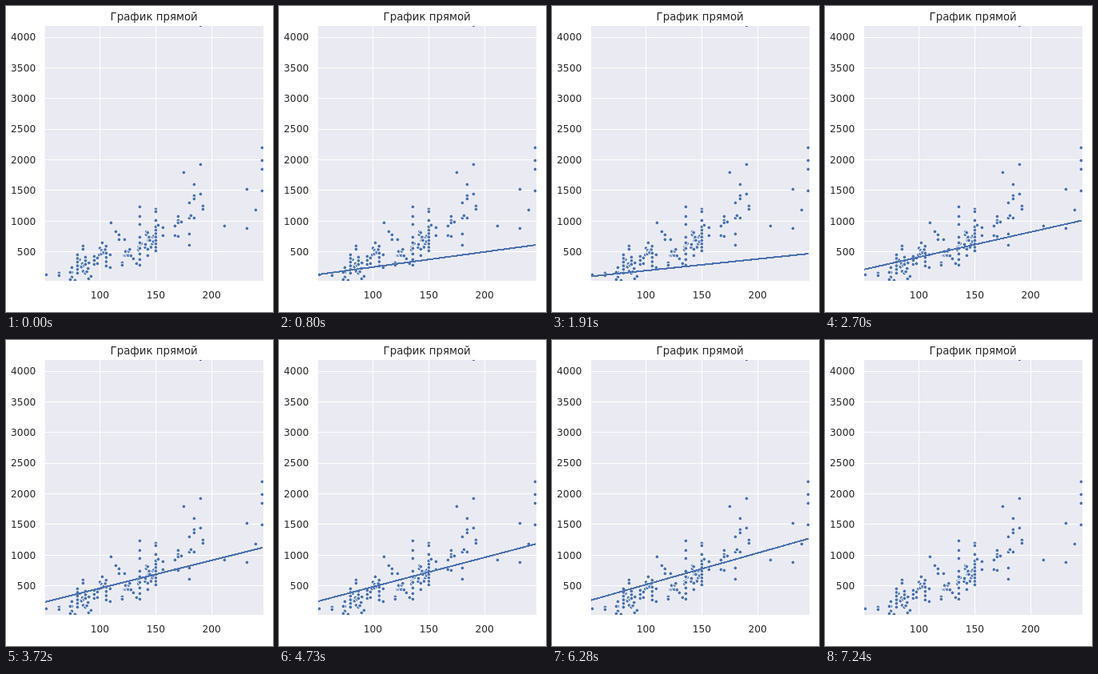
Write an HTML page that moves like this. It is 334 by 383 pixels and loops after 7290 ms.

```html
<!DOCTYPE html>
<html lang="ru">
<head>
<meta charset="utf-8">
<title>График прямой</title>
<style>
  html, body { margin: 0; width: 100%; height: 100%; overflow: hidden; background: #fff; }
  svg { display: block; }
  text { font: 12.22px "DejaVu Sans", sans-serif; fill: #262626; }
  #title { font-size: 13.33px; text-anchor: middle; }
  .x { text-anchor: middle; }
  .y { text-anchor: end; }
  #grid line { stroke: #fff; stroke-width: 1; }
  #dots circle { fill: #4c72b0; stroke: #fff; stroke-width: 0.9; }
  #fit { stroke: #4c72b0; stroke-width: 2.1; shape-rendering: crispEdges; }
</style>
</head>
<body>
<svg width="334" height="383" viewBox="0 0 334 383">
  <clipPath id="area"><rect x="49" y="25" width="273" height="319"/></clipPath>
  <rect x="49" y="25" width="273" height="319" fill="#eaeaf2"/>
  <g id="grid"></g>
  <g id="labels"></g>
  <g clip-path="url(#area)">
    <g id="dots"></g>
    <line id="fit"/>
  </g>
  <text id="title" x="185.2" y="18">График прямой</text>
</svg>
<script>
const LOOP = 7290;
const $ = id => document.getElementById(id);

// data units to pixels
const px = v => 117.4 + (v - 100) * 1.398;
const py = v => 345.8 - v * 0.0767;

function add(parent, tag, attrs, text) {
  const el = document.createElementNS("http://www.w3.org/2000/svg", tag);
  for (const k in attrs) el.setAttribute(k, attrs[k]);
  if (text) el.textContent = text;
  $(parent).append(el);
}

const snap = v => Math.floor(v) + 0.5;
for (let v = 100; v <= 200; v += 50) {
  const x = snap(px(v));
  add("grid", "line", { x1: x, x2: x, y1: 25, y2: 344 });
  add("labels", "text", { class: "x", x: px(v), y: 365.5 }, String(v));
}
for (let v = 500; v <= 4000; v += 500) {
  const y = snap(py(v));
  add("grid", "line", { x1: 49, x2: 322, y1: y, y2: y });
  add("labels", "text", { class: "y", x: 37.2, y: py(v) + 4.4 }, String(v));
}

const dot = (x, y) => add("dots", "circle", { cx: x + 0.4, cy: y + 0.4, r: 2.4 });

let seed = 11;
const rand = () => (seed = (seed * 16807) % 2147483647) / 2147483647;
function cloud(n, x, y, w, h) {
  for (let i = 0; i < n; i++) dot(x + w * (i + rand()) / n, y + h * rand());
}
function stack(n, x, top, bottom) {
  for (let i = 0; i < n; i++) dot(x, top + (bottom - top) * i / (n - 1));
}

cloud(12, 90, 316, 14, 22);
cloud(8, 116, 300, 9, 14);
cloud(8, 147, 304, 9, 10);
cloud(5, 165, 289, 4, 18);
cloud(15, 173, 281, 12, 21);
stack(3, 82, 327, 339);
stack(6, 89, 311, 334);
stack(3, 99, 314, 323);
stack(3, 110, 313, 323);
stack(2, 114, 315, 322);
stack(4, 125, 309, 325);
stack(6, 167, 289, 324);
stack(8, 187, 276, 306);

// single points: x, then the heights at that x
const points = [
  [50, 336], [66, 334, 337], [80, 333, 342], [86, 343], [96, 300, 304],
  [103, 341], [106, 338], [120, 296], [130, 311, 327], [131, 271], [137, 282],
  [141, 286, 292], [145, 321, 324], [148, 292], [159, 316], [163, 322],
  [167, 251, 263, 273], [177, 304, 312], [187, 254, 257, 268], [190, 274],
  [196, 277, 287], [211, 275, 287], [215, 263, 268, 271, 288], [219, 270],
  [222, 208], [229, 246, 265, 285, 299], [231, 262], [235, 223, 237, 241, 265],
  [243, 24, 198, 235], [246, 250, 254], [273, 275], [301, 229, 278],
  [312, 255], [320, 177, 193, 204, 231]
];
for (const [x, ...ys] of points) for (const y of ys) dot(x, y);

// runs of updates: first and last time, count, first and last slope
const runs = [
  [130, 130, 1, 1.62, 1.62],
  [410, 1350, 6, 1.8, 4.66],
  [1560, 1910, 3, 3.6, 1.9],
  [2140, 2490, 4, 2.5, 4],
  [2700, 3720, 6, 4.1, 4.56],
  [3940, 4730, 5, 4.6, 4.8],
  [4890, 6050, 7, 4.66, 6.39],
  [6280, 6850, 4, 5.16, 4.74]
];

// the line jumps at each update and holds until the next one
function slopeAt(t) {
  if (t >= 7240) return 0;
  let slope = 0;
  for (const [t0, t1, n, a, b] of runs) {
    if (t < t0) break;
    const gap = (t1 - t0) / (n - 1);
    const k = n > 1 ? Math.min(1, Math.floor((t - t0) / gap + 1e-6) / (n - 1)) : 0;
    slope = a + (b - a) * k ** 1.57;
  }
  return slope;
}

const fit = $("fit");
function draw(t) {
  const slope = slopeAt(t);
  fit.setAttribute("visibility", slope ? "visible" : "hidden");
  [51.2, 245.5].forEach((v, i) => {
    fit.setAttribute("x" + (i + 1), px(v));
    fit.setAttribute("y" + (i + 1), py(slope * v));
  });
}

const start = performance.now();
function tick() {
  draw((performance.now() - start) % LOOP);
  requestAnimationFrame(tick);
}
tick();
</script>
</body>
</html>
```
